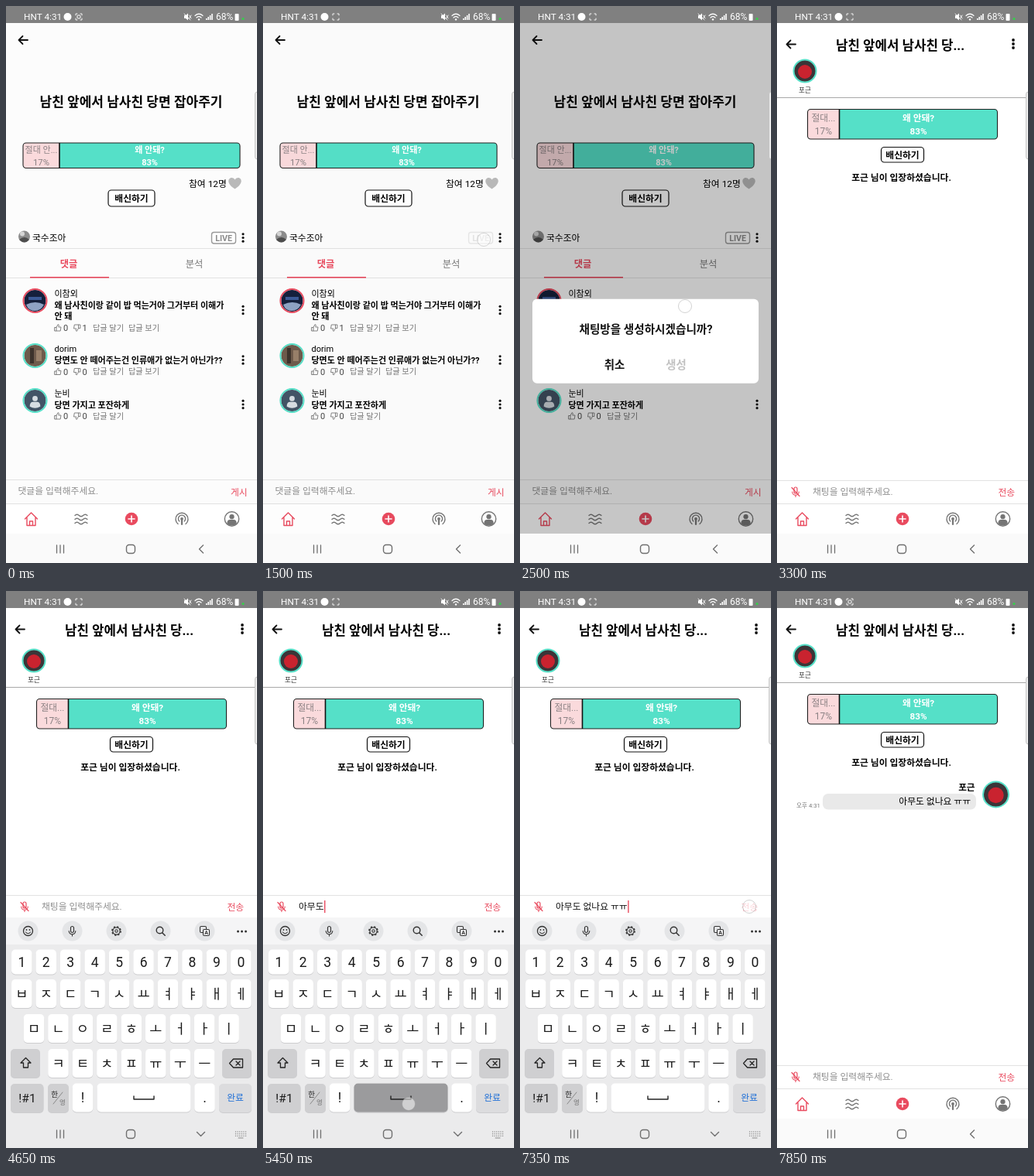
An HTML page for the animation above (8 s loop, 324 px wide and 720 px high).

```html
<!DOCTYPE html>
<html lang="ko">
<head>
<meta charset="utf-8">
<title>투표와 채팅</title>
<style>
html, body { margin: 0; width: 100%; height: 100%; overflow: hidden; background: #fff; }
svg { display: block; width: 100%; height: 100%; font-family: Roboto, 'Noto Sans CJK KR', sans-serif; }
text { white-space: pre; }
</style>
</head>
<body>
<svg id="stage" viewBox="0 0 324 720"></svg>
<script>
const RED = '#e94b5f', TEAL = '#55e0c8', GREY = '#757575', INK = '#333', NAV = '#6f6f6f';
const BOLD = 'font-weight="700"', MEDIUM = 'font-weight="500"';
const MID = 'text-anchor="middle"', END = 'text-anchor="end"', BOLD_MID = `${BOLD} ${MID}`;
const USER = '포근';
const $ = id => document.getElementById(id);

// y is the vertical middle of the line
const text = (x, y, s, size, fill = '#000', more = '') =>
  `<text x="${x}" y="${y + size * .37}" font-size="${size}" fill="${fill}" ${more}>${s}</text>`;
const rect = (x, y, w, h, fill, r = 0, more = '') =>
  `<rect x="${x}" y="${y}" width="${w}" height="${h}" rx="${r}" fill="${fill}" ${more}/>`;
const disc = (x, y, r, fill, more = '') =>
  `<circle cx="${x}" cy="${y}" r="${r}" fill="${fill}" ${more}/>`;
const line = (d, stroke, w = 1.3, more = '') =>
  `<path d="${d}" fill="none" stroke="${stroke}" stroke-width="${w}" stroke-linecap="round" stroke-linejoin="round" ${more}/>`;
const fillPath = (d, fill) => `<path d="${d}" fill="${fill}"/>`;
const group = (id, s) => `<g id="${id}">${s}</g>`;
const at = (x, y, s, more = '') => `<g transform="translate(${x} ${y}) ${more}">${s}</g>`;
const outline = (c, w) => `stroke="${c}" stroke-width="${w}"`;

const more3 = (x, y, gap, r = 1.6) => [-gap, 0, gap].map(d => disc(x, y + d, r, '#111')).join('');
const backArrow = (x, y) => line(`M${x + 6} ${y}h-11.5m5-5l-5 5 5 5`, '#111', 1.8);
const rule = (y, c = '#e2e2e2') => rect(0, y, 324, 1, c);
const button = (x, y, w, h) => rect(x, y, w, h, '#fff', 4, outline('#111', 1.2)) +
  text(x + w / 2, y + h / 2, '배신하기', 11.8, '#000', BOLD_MID);

function vote(x, y, w, h, split, label, size, y1, y2) {
  const a = (x + split) / 2, b = (split + x + w) / 2;
  return rect(x, y, w, h, TEAL, 4) +
    fillPath(`M${split} ${y}H${x + 4}q-4 0-4 4v${h - 8}q0 4 4 4H${split}z`, '#fadadc') +
    rect(x, y, w, h, 'none', 4, outline('#222', 1.1)) + rect(split - .8, y, 1.6, h, '#111') +
    text(a, y1, label, size, '#8a8083', MID) + text(a, y2, '17%', size + .3, '#8a8083', MID) +
    text(b, y1, '왜 안돼?', size, '#fff', BOLD_MID) + text(b, y2, '83%', size, '#fff', BOLD_MID);
}

const person = (x, y, c, s) => at(x, y,
  disc(0, -3, 4, c) + fillPath('M-8 9q0-7 5-7h6q5 0 5 7q-8 5-16 0z', c), `scale(${s})`);
const portrait = (x, y, r) => disc(x, y, r - 1, '#3b3538') + disc(x, y + 1, r * .6, '#c9232f');
const ring = (x, y, r, c) => disc(x, y, r - 1, 'none', outline(c, 2));

const thumb = line('M-4-.5h2v4.5h-2zM-2-.5L0-4.3q1.8 0 1.2 1.8L.8-1h3.2l-.8 5H-2', '#777', .9);
function comment(y, name, lines, down, replies) {
  const foot = y + 15 + lines.length * 14.5;
  return text(62.5, y, name, 11) +
    lines.map((s, i) => text(62.5, y + 15.2 + i * 14, s, 11, '#000', BOLD)).join('') +
    at(67, foot, thumb) + text(74, foot, '0', 11, '#444') +
    at(91.5, foot, thumb, 'rotate(180)') + text(98.5, foot, down, 11, '#444') +
    text(112, foot, '답글 달기', 10.2, GREY, MEDIUM) +
    (replies ? text(158, foot, '답글 보기', 10.2, GREY, MEDIUM) : '');
}

const tabBar = rect(0, 643, 324, 39, '#fff') + rule(643) +
  line('M24.5 663l8-8 8 8M27 661.5v10h11v-10M30.5 671v-5h4v5', RED, 1.4) +
  [658.5, 663.5, 668.5].map(y => line(`M89 ${y}q2.7-2.6 5.3 0t5.3 0 5.3 0`, GREY, 1.4)).join('') +
  disc(162, 663, 8.3, RED) + line('M158 663h8m-4-4v8', '#fff', 1.6) +
  line('M222 669.5a8 8 0 1 1 10 0M223.8 666a4.6 4.6 0 1 1 6.4 0', GREY, 1.4) +
  disc(227, 663, 1.9, GREY) + line('M227 665v5', GREY, 2.2) +
  disc(291.5, 663, 9.2, '#fff', outline(GREY, 1.4)) + person(291.5, 662.5, GREY, .78);

const statusBar = rect(0, 0, 324, 22, '#808080') + text(23, 14, 'HNT 4:31', 11.8, '#fff') +
  disc(79.5, 14, 5, '#fff') + line('M90 12v-2h2m4 0h2v2m0 4v2h-2m-4 0h-2v-2', '#fff', .9) +
  group('rec', rect(92, 12, 4, 4, 'none', 1, outline('#fff', 1))) +
  fillPath('M230 12h2l3-2.5v9L232 16h-2z', '#fff') + line('M236.5 12l2.5 4m0-4l-2.5 4M230 10l8 8', '#fff', .9) +
  line('M244 12.5q5-4.5 10 0M246 15q3-2.6 6 0', '#fff', 1.2) + disc(249, 17.4, 1.2, '#fff') +
  [0, 1, 2, 3].map(i => rect(258 + i * 2.4, 16 - i * 2, 1.6, 2 + i * 2, '#fff')).join('') +
  text(271, 14, '68%', 12, '#fff') + rect(295.5, 10, 5, 9, '#fff', 1) + disc(306, 16.5, 1.6, '#35d04a');

const votePage = rect(0, 22, 324, 660, '#fcfcfc') + backArrow(22, 44) +
  text(161.5, 124, '남친 앞에서 남사친 당면 잡아주기', 17, '#000', BOLD_MID) +
  vote(22, 177, 280, 32.5, 69, '절대 안...', 11, 186, 201.5) +
  text(236, 230, '참여 12명', 11.8) +
  fillPath('M295.5 236.5C283.5 229 287 222 291.5 222q3 0 4 2.5q1-2.5 4-2.5c4.5 0 8 7-4 14.5z', '#b9b9b9') +
  button(132, 238, 60, 21) +
  disc(23.5, 298, 7.5, '#8c8c8c') + disc(21, 294.5, 3, '#d5d5d5') + fillPath('M17 302q7-6 13 0q-6 7-13 0z', '#4d4d4d') +
  text(34, 299.5, '국수조아', 11.8) +
  group('live', rect(265.5, 292.5, 31, 14.5, '#fff', 3, outline('#999', 1.4)) +
    text(281, 300, 'LIVE', 10.6, '#8a8a8a', BOLD_MID)) +
  more3(306, 299.5, 4.7) + rule(313) +
  text(81, 333, '댓글', 12.3, RED, BOLD_MID) + text(243, 333, '분석', 12.3, '#777', MID) +
  rule(351) + rect(31, 350, 102, 1.6, RED) +
  disc(37.5, 381, 14, '#15203c') + fillPath('M26 386q12-6 23 0q-4 8-12 8t-11-8z', '#8fa3c4') +
  rect(29, 376, 17, 4, '#3c5a96') + ring(37.5, 381, 16, RED) +
  disc(37.5, 452, 14, '#6e5b4c') + rect(31, 442, 5, 20, '#3c332c') + rect(39, 445, 7, 14, '#98806a') + ring(37.5, 452, 16, TEAL) +
  disc(37.5, 510, 14, '#435466') + person(37.5, 510, '#d7dde2', .85) + ring(37.5, 510, 16, TEAL) +
  comment(372, '이참외', ['왜 남사친이랑 같이 밥 먹는거야 그거부터 이해가', '안 돼'], 1, true) +
  comment(443, 'dorim', ['당면도 안 떼어주는건 인류애가 없는거 아닌가??'], 0, true) +
  comment(500.5, '눈비', ['당면 가지고 포잔하게'], 0, false) +
  [393, 457.5, 515].map(y => more3(306, y, 4.7)).join('') +
  rule(612) + text(15.5, 627, '댓글을 입력해주세요.', 11.8, '#8f8f8f') + text(290, 628.5, '게시', 11.8, RED, MEDIUM) +
  tabBar;

const dialog = rect(16, 298, 292, 109, '#fff', 6) +
  text(162.5, 337, '채팅방을 생성하시겠습니까?', 14.6, '#111', BOLD_MID) +
  text(122, 383, '취소', 14.4, '#111', BOLD_MID) +
  group('make', text(201.5, 383, '생성', 14.4, '#111', BOLD_MID));

const mic = (x, y, c) => rect(x - 2, y - 6, 4, 8, 'none', 2, outline(c, 1.2)) +
  line(`M${x - 4.3} ${y}a4.3 4.3 0 0 0 8.6 0M${x} ${y + 4.5}v2`, c, 1.1);
const chatPage = rect(0, 22, 324, 660, '#fff') + tabBar +
  group('body',
    group('joined', portrait(36, 84, 15)) + ring(36, 84, 15.5, TEAL) +
    text(36, 109, USER, 8.6, '#333', MID) + rule(118, '#a8a8a8') +
    vote(39.5, 133.5, 245, 38.5, 80.5, '절대...', 11.7, 145, 162) +
    button(134.5, 182.5, 55, 19.5) +
    text(160.5, 222, USER + ' 님이 입장하셨습니다.', 11.8, '#000', BOLD_MID) +
    group('msg', rect(59, 262, 198, 20.5, '#e9e9e9', 7) +
      text(250, 272, '아무도 없나요 ㅠㅠ', 11.8, '#000', END) +
      text(255.5, 254, USER, 11.6, '#000', `${BOLD} ${END}`) +
      text(25, 277.5, '오후 4:31', 7.7, '#777') +
      portrait(282.5, 263, 17) + ring(282.5, 263, 17.5, TEAL))) +
  backArrow(18, 49.5) + text(76, 50.7, '남친 앞에서 남사친 당...', 16.8, '#000', BOLD) + more3(305, 49, 5, 1.9) +
  group('field', rect(0, 613, 324, 30, '#fff') + rule(613) +
    mic(24, 628, RED) + line('M19 622.5l10 11', RED, 1.2) +
    text(46, 628, '채팅을 입력해주세요.', 11.8, '#8f8f8f', 'id="hint"') +
    text(46, 628, '', 11.8, '#111', 'id="typed"') + rect(0, 620, 1.4, 16, RED, 0, 'id="caret"') +
    text(285.5, 628.5, '전송', 11.8, RED, `id="send" ${MEDIUM}`));

// Keyboard layout: symbol -> [centre x, centre y, width, height]
const keys = {};
[['1234567890', 20.3, 479.5, 32], ['ㅂㅈㄷㄱㅅㅛㅕㅑㅐㅔ', 20.3, 520.5, 37],
 ['ㅁㄴㅇㄹㅎㅗㅓㅏㅣ', 36, 565.5, 37], ['ㅋㅌㅊㅍㅠㅜㅡ', 67.5, 610.5, 37]]
  .forEach(([row, x, y, h]) => [...row].forEach((c, i) => keys[c] = [x + i * 31.45, y, 26.5, h]));
Object.assign(keys, { '!': [99, 655, 26.5, 37], ' ': [178, 655, 121, 37], '.': [256.5, 655, 26.5, 37] });

const cap = (x, y, w, h, fill) => rect(x, y + 1, w, h, '#cdcdcf', 5) + rect(x, y, w, h, fill, 5);
const keyCap = (c, fill) => {
  const [x, y, w, h] = keys[c];
  return cap(x - w / 2, y - h / 2, w, h, fill) + (c === ' '
    ? line('M165 653v4h26v-4', '#222', 1.4)
    : text(x, y, c, 17.5, '#1b1b1b', MID));
};
const tool = (x, s) => disc(x, 439.5, 13, '#e4e5e7') + at(x, 439.5, s);
const keyboard = rect(0, 422, 324, 260, '#ebebec') + rect(0, 422, 324, 35, '#f5f5f6') +
  tool(28.5, disc(0, 0, 6, 'none', outline(INK, 1.3)) + disc(-2, -1.5, .9, INK) + disc(2, -1.5, .9, INK) + line('M-3 1.5q3 3.5 6 0', INK, 1.1)) +
  tool(85.5, mic(0, 0, INK)) +
  tool(142.5, disc(0, 0, 4.6, 'none', outline(INK, 1.2)) + disc(0, 0, 1.7, 'none', outline(INK, 1.1)) +
    disc(0, 0, 5.6, 'none', outline(INK, 1.6) + ' stroke-dasharray="2.2"')) +
  tool(199.5, disc(-1, -1, 4.3, 'none', outline(INK, 1.4)) + line('M2.2 2.2l3.5 3.5', INK, 1.5)) +
  tool(256.5, rect(-6, -6, 8, 8, 'none', 1.5, outline(INK, 1.1)) + rect(-2, -2, 8, 8, '#f5f5f6', 1.5, outline(INK, 1.1)) + text(2, 2, 'A', 7, INK, BOLD_MID)) +
  [299.5, 304.5, 309.5].map(x => disc(x, 440, 1.5, INK)).join('') +
  Object.keys(keys).map(c => keyCap(c, '#fff')).join('') +
  [[6, 592, 38], [279, 592, 38], [6, 637, 42.5], [54, 637, 27]].map(([x, y, w]) => cap(x, y, w, 37, '#cfcfd1')).join('') +
  cap(275, 637, 42, 37, '#dcdcde') +
  line('M25.5 603.5l-6.5 6.5h3.5v6h6v-6h3.5z', '#222', 1.3) +
  line('M288.5 610.5l5-5.5h12v11h-12zM297 608l5 5m0-5l-5 5', '#222', 1.3) +
  text(27.5, 655, '!#1', 15.5, '#1b1b1b', MID) +
  text(62.5, 650, '한', 9.5, '#222', MID) + line('M61 663l12-15', '#777', .8) + text(73, 661, '영', 8.5, '#777', MID) +
  text(296, 655, '완료', 11.8, '#1f6fd6', `${MID} ${MEDIUM}`);

const navBar = rect(0, 682, 324, 38, '#fafafa', 0, 'id="navBg"') +
  line('M65.5 697v10m4.5-10v10m4.5-10v10', NAV, 1.3) + rect(155.5, 696.5, 11, 11, 'none', 3.5, outline(NAV, 1.4)) +
  group('navBack', line('M254.5 697l-5 5 5 5', NAV, 1.4)) +
  group('navDown', line('M246.5 699.5l5 5 5-5', NAV, 1.4) +
    line('M296.5 699h13m-13 2.7h13m-13 2.7h13', '#888', 1.4, 'stroke-dasharray="0 2.6"') + line('M300 707h6', '#888', 1));

$('stage').innerHTML = votePage + rect(0, 22, 324, 660, '#000', 0, 'id="dim"') + group('dialog', dialog) +
  group('chat', chatPage) + group('keyboard', keyboard) + group('press', '') + navBar +
  rect(321.5, 111, 8, 87, '#eee', 3, outline('#c4c4c4', 1)) + statusBar + group('taps', '');

// Typing script
const strokes = [...'ㅇㅏㅁㅜㄷㅗ ㅇㅓㅂㅅㄴㅏㅇㅛ ㅠㅠ'];
const drafts = ['ㅇ', '아', '암', '아무', '아묻', '아무도', '아무도 '];
['ㅇ', '어', '업', '없', '없ㄴ', '없나', '없낭', '없나요', '없나요 ', '없나요 ㅠ', '없나요 ㅠㅠ']
  .forEach(s => drafts.push('아무도 ' + s));
const strokeTime = i => 4690 + i * 118 + Math.max(0, i - 14) * 40;

// Taps: [start, x, y, hold]
const taps = [[1230, 285, 302, 230], [2240, 213, 388, 230], [3950, 150, 628, 90], [7230, 296, 408, 90]];
strokes.forEach((c, i) => taps.push([strokeTime(i), keys[c][0] + (i % 2 ? 0 : 10), keys[c][1] + (i % 2 ? 1 : 8), 50]));

const clamp = v => Math.min(1, Math.max(0, v));
const ramp = (t, a, b) => clamp((t - a) / (b - a));
const ease = p => p < .5 ? 2 * p * p : 1 - 2 * (1 - p) ** 2;
const move = (id, y) => $(id).setAttribute('transform', `translate(0 ${y})`);
const fade = (id, v) => $(id).setAttribute('opacity', v);
const show = (id, on) => $(id).setAttribute('visibility', on ? 'visible' : 'hidden');

function draw(t) {
  show('rec', (t + 200) % 1000 < 500);
  fade('live', 1 - .8 * (ramp(t, 1230, 1350) - ramp(t, 1500, 1700)));

  const open = ease(ramp(t, 1460, 1760)) - ease(ramp(t, 2430, 2730));
  fade('dim', .25 * open);
  move('dialog', 720 * (1 - open));
  fade('make', 1 - .75 * ramp(t, 2240, 2360));

  const enter = ramp(t, 2640, 2790);
  fade('chat', enter);
  move('chat', 30 * (1 - ease(enter)));
  fade('joined', ramp(t, 3170, 3300));

  const up = ease(ramp(t, 4060, 4420)) - ease(ramp(t, 7420, 7760));
  move('body', 6 * up);
  move('field', -220 * up);
  move('keyboard', 260 * (1 - up));
  show('keyboard', up > 0);
  show('navDown', up > .3);
  show('navBack', up <= .3);
  $('navBg').setAttribute('fill', up > .3 ? '#ebebec' : '#fafafa');

  const sent = t >= 7360;
  const count = sent ? 0 : strokes.filter((c, i) => t >= strokeTime(i) + 70).length;
  $('typed').textContent = count ? drafts[count - 1] : '';
  show('hint', !count);
  show('msg', sent);
  fade('send', 1 - .7 * (ramp(t, 7230, 7300) - ramp(t, 7330, 7480)));
  const idle = count ? t - strokeTime(count - 1) - 70 : 0;
  show('caret', count && idle % 1000 < 500);
  $('caret').setAttribute('x', 46.5 + $('typed').getComputedTextLength());

  const c = strokes.find((s, i) => t >= strokeTime(i) && t < strokeTime(i) + 90);
  let pop = '';
  if (c) {
    const [x, y] = keys[c], px = Math.max(27, x + 1);
    pop = keyCap(c, '#9b9b9d');
    if (c !== ' ') pop += rect(px - 25, y - 86.5, 50, 64, '#000', 7, 'opacity=".1"') +
      rect(px - 24.5, y - 87, 49, 63, '#fcfcfc', 7) + text(px, y - 52.5, c, 28, '#111', MID);
  }
  $('press').innerHTML = pop;

  $('taps').innerHTML = taps.map(([start, x, y, hold]) => {
    const a = t < start ? 0 : 1 - ramp(t, start + hold, start + hold + 120);
    return a ? disc(x, y, 8.5, '#fff', `fill-opacity=".55" stroke="#999" stroke-opacity=".6" opacity="${a}"`) : '';
  }).join('');
}

function tick() {
  draw(performance.now() % 8000);
  requestAnimationFrame(tick);
}
requestAnimationFrame(tick);
</script>
</body>
</html>
```
